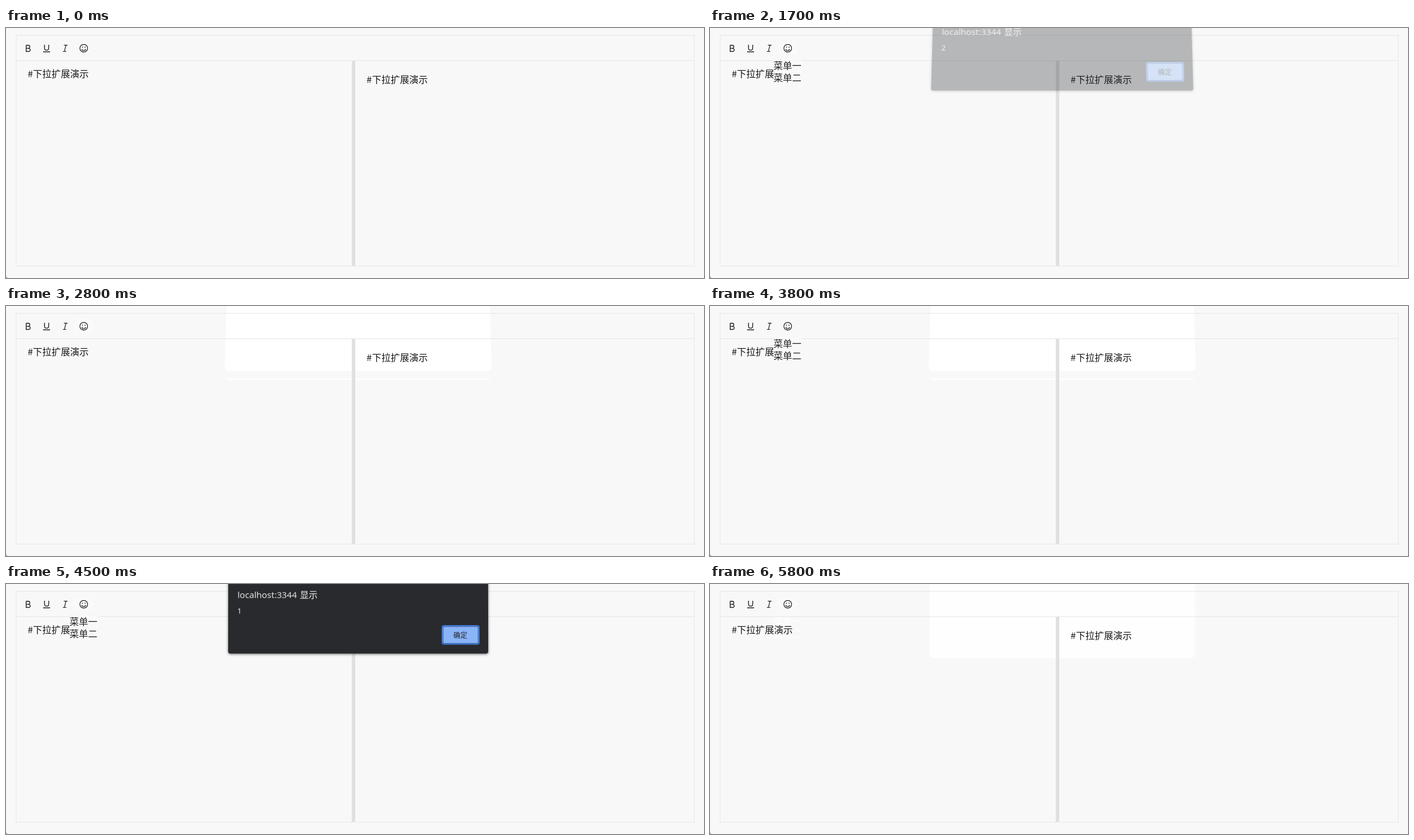
These frames come from a looping animation (1203x432 px, 7.7 s). An HTML page:

```html
<!DOCTYPE html>
<html lang="zh-CN">
<head>
<meta charset="utf-8">
<style>
  html, body { margin: 0; width: 100%; height: 100%; overflow: hidden; background: #f8f8f8; }
  svg { position: absolute; left: 0; top: 0; overflow: visible; }
  text { font: 16px "Noto Sans CJK SC", "Noto Sans CJK", sans-serif; }
  .latin { font-family: "Open Sans", "Noto Sans", sans-serif; }
  .icon { fill: none; stroke: #222; stroke-width: 1.4; }
  #dialog { position: absolute; left: 0; top: 0; width: 1203px; height: 432px; transform-origin: 607px 49px; }
  #panel { position: absolute; left: 383px; top: -40px; width: 448px; height: 161px; border-radius: 4px;
    background: #292a2d; box-shadow: 0 1px 4px rgba(0, 0, 0, .55); }
</style>
</head>
<body>
<svg width="1203" height="432">
  <path d="M0 427Q0 432 5 432H0Z" fill="#a8a8a8"/>
  <g id="trace1" fill="#fff">
    <path d="M380 0H834L837 106Q837 112 831 112H383Q377 112 377 106Z"/>
    <path d="M379 123Q381 128 386 128H829Q834 128 836 123Q832 124.500 829 124.500H386Q382 124.500 379 123Z" fill="#fdfdfd"/>
  </g>
  <path id="trace2" d="M378 0H836V120Q836 128 828 128H386Q378 128 378 120Z" fill="#fefefe"/>
  <rect id="hover" x="118" y="23" width="32" height="24" fill="#fafafa"/>
  <path d="M17.500 12.500H1186.500V411.500H17.500ZM17.500 56.500H1186.500" fill="none" stroke="#e6e6e6"/>
  <rect x="596" y="57" width="6" height="354" fill="#e0e0e0"/>

  <g class="icon">
    <path d="M34.800 29.700H38Q41 29.700 41 32.400T38 35.100H34.800M38 35.100Q41.700 35.100 41.700 37.900T38.300 40.500H34.800V29.700"/>
    <path d="M66.400 29V34.500Q66.400 38.400 70 38.400T73.600 34.500V29M64 41.300H76"/>
    <path d="M99.800 29.700H106M98 40.500H104M103.400 29.700L100.600 40.500" stroke-width="1.200"/>
    <circle cx="134" cy="35" r="6.700" stroke-width="1.200"/>
    <path d="M130.600 36.500Q131.300 39 134 39T137.400 36.500" stroke-width="1.200"/>
    <path d="M130.900 33.200H132.500M135.500 33.200H137.100" stroke-width="1.600"/>
  </g>

  <g id="faint" fill="#fff"><text x="109.500" y="71">菜单一</text><text x="109.500" y="92">菜单二</text></g>
  <g fill="#161616">
    <text x="37.500" y="84.500">#</text><text x="46.500" y="84.500">下拉扩展演示</text>
    <text x="621.500" y="94.500">#</text><text x="631" y="94.500">下拉扩展演示</text>
  </g>
  <g id="menu">
    <rect x="110" y="55" width="48" height="41" fill="#f9f9f9"/>
    <g fill="#222"><text x="109.500" y="71">菜单一</text><text x="109.500" y="92">菜单二</text></g>
  </g>
</svg>

<div id="dialog">
  <div id="panel"></div>
  <svg width="1203" height="432">
    <g fill="#f1f3f4">
      <text class="latin" x="399" y="25" style="font-size:15.200px">localhost:3344</text>
      <text x="506.500" y="25" style="font-size:15.300px">显示</text>
      <text class="latin" id="value" x="398.500" y="52" style="font-size:13.500px"></text>
    </g>
    <rect x="752" y="73" width="63" height="31.500" rx="3" fill="#202124" stroke="#4285f4" stroke-width="2"/>
    <rect id="button" x="753.500" y="74.500" width="60" height="28.500" rx="2"/>
    <text x="783" y="93.700" text-anchor="middle" fill="#202124" style="font-size:12px">确定</text>
  </svg>
</div>

<script>
const LOOP = 7700;
const $ = id => document.getElementById(id);
const within = (t, a, b) => t >= a && t < b;

// [start ms, tilt, opacity]
const poses = [
  [0, 0, 0],
  [1700, 1, .32], [1800, .12, .95], [1900, 0, 1],
  [2600, .2, .85], [2700, 1, .3], [2800, 0, 0],
  [4400, .9, .4], [4500, .06, 1], [4600, 0, 1],
  [5700, .15, .8], [5800, 0, 0]
];

function show(id, opacity) {
  $(id).style.opacity = +opacity;
}

function menuOpacity(t, open, close) {
  return within(t, open, close) ? (t < open + 100 ? .5 : 1) : 0;
}

function draw(t) {
  const [, tilt, opacity] = poses.findLast(p => p[0] <= t);
  show('dialog', opacity);
  $('dialog').style.transform = tilt
    ? `translateY(${-13 * tilt}px) perspective(1000px) rotateX(${7 * tilt}deg)` : 'none';
  $('value').textContent = t < 3400 ? 2 : 1;
  $('button').style.fill = within(t, 2400, 2800) || within(t, 5000, 5800) ? '#86adf0' : '#8ab4f8';

  show('menu', menuOpacity(t, 600, 2800) + menuOpacity(t, 3400, 5800));
  show('hover', t >= 600 && !within(t, 3800, 4400));
  show('trace1', within(t, 2800, 4400));
  show('trace2', t >= 5800);
  show('faint', t >= 5800);
}

const start = performance.now();
function tick() {
  draw((performance.now() - start) % LOOP);
  requestAnimationFrame(tick);
}
tick();
</script>
</body>
</html>
```
